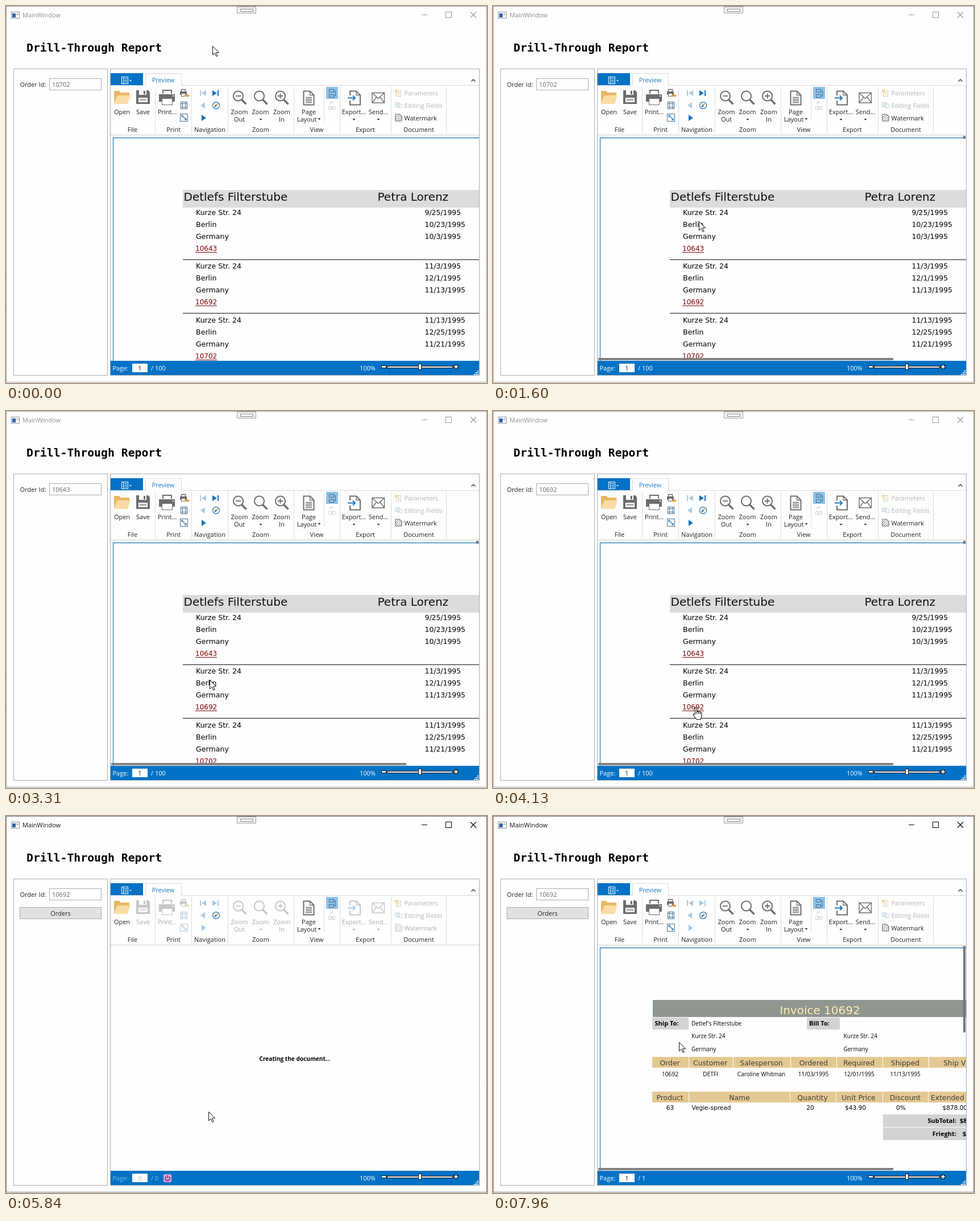
An HTML page that plays this animation: 846x662 px, repeating every 8 s.

```html
<!DOCTYPE html>
<html lang="en">
<head>
<meta charset="utf-8">
<title>Drill-Through Report</title>
<style>
html, body { margin: 0; width: 100%; height: 100%; overflow: hidden; background: #fefefe; }
svg { display: block; }
text { font: 11px "Open Sans", "Noto Sans", sans-serif; fill: #222; white-space: pre; }
.title { font: bold 19.8px "DejaVu Sans Mono", monospace; fill: #000; }
.head { font: 20px "DejaVu Sans", sans-serif; fill: #111; }
.body { font: 12.6px "DejaVu Sans", sans-serif; fill: #000; }
.date { font-size: 12.4px; }
.link { font-size: 12px; fill: #800000; }
.cream { fill: #fff0b5; }
.cell { font: 12.4px "DejaVu Sans", sans-serif; fill: #3c3c3c; }
.small { font-size: 10.1px; fill: #000; }
.item { font: 10.6px "DejaVu Sans", sans-serif; fill: #000; }
.bold { font-weight: bold; fill: #000; }
.off { fill: #b4b4b4; }
.grey { fill: #666; }
.white { fill: #fff; }
.blue { fill: #1a7cc4; }
.mid { text-anchor: middle; }
.end { text-anchor: end; }
</style>
</head>
<body>
<script>
const BLUE = '#0072c6', DARK = '#6d6d6d', LINE = '#a9abb0';
const GUIDE = 'stroke="#c9c9c9" stroke-dasharray="5 3"';

const rect = (x, y, w, h, fill) => `<rect x="${x}" y="${y}" width="${w}" height="${h}" fill="${fill}"/>`;
const box = (x, y, w, h, stroke, fill = 'none') =>
  `<rect x="${x + .5}" y="${y + .5}" width="${w - 1}" height="${h - 1}" stroke="${stroke}" fill="${fill}"/>`;
const path = (d, stroke, width = 1, fill = 'none', more = '') =>
  `<path d="${d}" stroke="${stroke}" stroke-width="${width}" fill="${fill}" ${more}/>`;
const shape = (d, fill) => `<path d="${d}" fill="${fill}"/>`;
const circle = (x, y, r, stroke, width, fill = 'none') =>
  `<circle cx="${x}" cy="${y}" r="${r}" stroke="${stroke}" stroke-width="${width}" fill="${fill}"/>`;
const text = (x, y, str, cls = '', more = '') => `<text x="${x}" y="${y}" class="${cls}" ${more}>${str}</text>`;
const mid = (x, y, str, cls = '') => text(x, y, str, 'mid ' + cls);
const group = (attrs, ...parts) => `<g ${attrs}>${parts.join('')}</g>`;
const caret = (x, y) => shape(`M${x - 2.5} ${y}h5l-2.5 3z`, '#333');

function windowFrame() {
  return group('',
    group('id="frame"', box(0, 0, 846, 661, 'currentColor')),
    rect(0, 471, 2, 1, '#ccc'), rect(0, 527, 2, 1, '#ccc'), rect(844, 471, 2, 1, '#ccc'),
    box(9, 10, 15, 12, '#8b8f96', '#fff'), rect(11, 13, 6, 7, '#2b62a8'), rect(18, 13, 4, 3, '#b9c7d8'),
    text(29, 20, 'MainWindow', '', 'id="caption"'),
    group('id="buttons"', rect(731, 15, 10, 1, 'currentColor'), box(773, 10, 11, 11, 'currentColor'),
      path('M817 10.5l10 10m0-10l-10 10', 'currentColor', 1.1)),
    box(406, 1, 34, 12, '#a0a0a0', '#f1f1f1'), box(412, 5, 23, 5, '#8a8a8a', '#fff'),
    text(36, 80, 'Drill-Through Report', 'title'),
    box(13, 110, 166, 539, LINE), box(183, 110, 650, 539, LINE),
    text(24.5, 142, 'Order Id:'),
    box(76, 127, 92, 21, LINE, '#fff'), text(81, 142, '', 'grey', 'id="field"'),
    group('id="orders"', box(24, 160, 144, 21, '#adadad', '#e1e1e1'), mid(96, 175, 'Orders')));
}

const magnifier = (x, sign) => circle(x, 158, 8.6, DARK, 2) + path(`M${x + 6} 164.5l8 8`, DARK, 3.2) +
  path(sign, DARK, 1.8);
const sheet = (x, stroke) => path(`M${x} 149.5h11l7 7v17h-18z`, stroke, 2, '#fff') +
  path(`M${x + 11} 149.5v7h7`, stroke, 1.3);

function ribbon() {
  const separators = [262, 326, 390, 506, 587, 677, 774].map(x => rect(x, 142, 1, 82, '#dcdcdc')).join('');
  const names = [[222.5, 'File'], [294.5, 'Print'], [358.5, 'Navigation'], [448, 'Zoom'], [546.5, 'View'],
    [632, 'Export'], [726, 'Document']].map(([x, s]) => mid(x, 221, s)).join('');
  return group('',
    rect(184, 118, 57, 22, BLUE),
    box(203, 124, 12, 13, '#fff'), rect(206, 124, 1, 13, '#fff'),
    path('M208 127.5h5m-5 3h5m-5 3h5', '#fff'), shape('M217 130h4l-2 2.5z', '#fff'),
    path('M184 139.5h61.5v-21h63v21H832', '#dadada'), mid(276.5, 134, 'Preview', 'blue'),
    path('M818.5 132.5l3.5-3.5 3.5 3.5', '#444', 1.5),
    rect(184, 226, 648, 1, '#cfcfcf'), separators, rect(559, 145, 1, 58, '#dcdcdc'), names,
    // open, compass and page layout never go grey
    shape('M190 171V149h9l3 3h15v6h-21z', '#e8b766'), shape('M196 157h23l-5 15h-24z', '#fbdca4'),
    mid(204, 190, 'Open'),
    circle(369.5, 174.5, 5.9, '#2477b5', 1.3, '#fff'), shape('M373 171l-2.2 5-2.8-2.8z', '#e0922f'),
    shape('M366 178l2-4.8 2.8 2.8z', '#2477b5'),
    sheet(523.5, DARK), path('M527 160.5h11m-11 3h11m-11 3h11m-11 3h11', DARK, 1.4),
    mid(532.5, 190, 'Page'), mid(529, 203, 'Layout'), caret(551, 197),
    rect(563, 142, 21, 21, '#8fc1e8'), path('M568.5 146.5h8v5h-8zM568.5 155.5h8v5h-8zM576.5 149h3v9h-3', '#466f91'),
    path('M567.5 176.5h5v5h-5zm6 0h5v5h-5zM570 173v-4h5m-2-1.5l2 1.5-2 2', '#cfcfcf'),
    // needs a finished document
    group('class="doc"',
      shape('M229 148h21l3 3v21h-24z', DARK), rect(234, 148, 13, 8, '#fff'), rect(242, 149, 3, 6, DARK),
      rect(233, 161, 16, 8, '#fff'), rect(235, 164, 12, 1.5, DARK), mid(241, 190, 'Save'),
      rect(275, 147, 17, 7, DARK), rect(277, 149, 13, 5, '#fff'), shape('M269 155h28v13h-28z', DARK),
      box(274, 162, 19, 12, DARK, '#fff'), rect(293, 157, 2, 2, '#fff'), mid(283.5, 190, 'Print...'),
      path('M308.5 150v-3.5h7v3.5', DARK, 1.4), rect(306, 150, 12, 6, DARK), box(308, 153, 8, 6, DARK, '#fff'),
      shape('M314 156h6l-2-2.5 5 4-5 4 2-2.500h-6z', '#dda04a'),
      box(307, 168, 12, 13, '#4d7291'), path('M310.5 168v13m5-13v13M307 171.500h12m-12 6h12', '#4d7291'),
      box(306, 189, 14, 14, '#4d7291'), path('M309 195v-3h3m-3 0l8 8m0-3v3h-3', '#2477b5', 1.2),
      magnifier(408.5, 'M404 158h9'), magnifier(445.5, ''), magnifier(482.5, 'M478 158h9m-4.500-4.500v9'),
      mid(410.5, 190, 'Zoom'), mid(410.5, 203, 'Out'), mid(447.5, 190, 'Zoom'), caret(448, 198),
      mid(485, 190, 'Zoom'), mid(485, 203, 'In'),
      sheet(605, DARK), rect(603, 157, 4, 9, '#fff'), path('M601 161.500h13m-4-4l4 4-4 4', '#2477b5', 2),
      mid(612, 190, 'Export...'), caret(612, 198),
      path('M644 152.500h21.500v17.500h-21.500zl10.700 10 10.800-10m-21.500 17.500l7.500-10m14 10l-7.500-10', DARK, 1.4),
      mid(655, 190, 'Send...'), caret(655, 198),
      path('M685 190h7l4 4v8h-11z', DARK, 1.2, '#fff'), path('M685 196l6-6m-6 10l9-9m-7 11l9-8m-5 8l5-4', DARK),
      text(700.5, 201, 'Watermark')),
    shape('M341 148h2v10h-2zM352 148v10l-8-5z', '#accae2'), shape('M350 169v11l-8-5.500z', '#accae2'),
    group('class="nav"', shape('M363 148v10l8-5zM372 148h2v10h-2z', '#1873b8'), shape('M344 191v11l8-5.500z', '#1873b8')),
    box(686, 148, 9, 11, '#d8d0bc', '#fffaf0'), rect(684, 147, 5, 5, '#f1dca5'), rect(690, 151, 1, 5, '#d8c08a'),
    text(700.5, 157, 'Parameters', 'off'),
    path('M684 170.500h9m-9 3h7m-7 3h9', '#bcd3e6', 1.5), box(690, 172, 7, 7, '#d3d3d3'),
    text(700.5, 179, 'Editing Fields', 'off'));
}

const page = guideX => path('M832 231.500H188.500V623', '#3585bd', 1.3) +
  path(`M${guideX}.5 232V623M189 323.500H832`, '', 1, 'none', GUIDE);

function report() {
  const dates = [['9/25/1995', '10/23/1995', '10/3/1995', '10643'], ['11/3/1995', '12/1/1995', '11/13/1995', '10692'],
    ['11/13/1995', '12/25/1995', '11/21/1995', '10702']];
  const blocks = dates.map((row, i) => {
    const y = 367 + Math.round(i * 94.3), id = row[3];
    return ['Kurze Str. 24', 'Berlin', 'Germany'].map((s, j) =>
      text(334, y + 21 * j, s, 'body') + text(736.5, y + 21 * j, row[j], 'body date')).join('') +
      text(333, y + 63, id, 'body link') + rect(333, y + 65, 38, 1, '#800000') +
      rect(311, y + 78, 521, 1, '#111');
  }).join('');
  return group('id="report"', page(276), rect(311, 323, 521, 31, '#dcdcdc'),
    text(312.5, 342, 'Detlefs Filterstube', 'head'), text(653.5, 342, 'Petra Lorenz', 'head'), blocks);
}

function invoice() {
  const header = (y, stops, labels) => stops.slice(1).map((x, i) =>
    rect(stops[i], y, x - stops[i] - 1, 19, '#e4c891')).join('') + labels.map(([x, s]) => mid(x, y + 15, s, 'cell')).join('');
  const values = (y, cls, list) => list.map(([x, s]) => mid(x, y, s, cls)).join('');
  return group('id="invoice"', page(279),
    rect(281, 323, 551, 30, '#8f9690'), mid(575, 348, 'Invoice 10692', 'head cream'),
    rect(280, 354, 64, 21, '#d3d3d3'), rect(552, 354, 58, 21, '#d3d3d3'),
    text(284.5, 368, 'Ship To:', 'bold'), text(556, 368, 'Bill To:', 'bold'),
    text(349, 368, "Detlef's Filterstube", 'small'),
    [349, 616.5].map(x => text(x, 390, 'Kurze Str. 24', 'small') + text(x, 413, 'Germany', 'small')).join(''),
    header(423, [280, 345, 423, 524, 605, 686, 767, 850], [[311, 'Order'], [382, 'Customer'], [472, 'Salesperson'],
      [564, 'Ordered'], [643.5, 'Required'], [725, 'Shipped']]), text(792, 438, 'Ship Via', 'cell'),
    values(457, 'small', [[311.5, '10692'], [382.5, 'DETFI'], [472, 'Caroline Whitman'], [563.5, '11/03/1995'],
      [644, '12/01/1995'], [725, '11/13/1995']]),
    header(484, [280, 345, 523, 604, 686, 766, 850], [[311, 'Product'], [433.5, 'Name'], [562, 'Quantity'],
      [643, 'Unit Price'], [725, 'Discount']]), text(770, 499, 'Extended Price', 'cell'),
    values(516, 'item', [[311.5, '63'], [384, 'Vegie-spread'], [558, '20'], [637.5, '$43.90'], [717.5, '0%']]),
    text(790.5, 516, '$878.00', 'item'),
    rect(686, 524, 146, 22, '#d3d3d3'), rect(686, 547, 146, 22, '#d3d3d3'),
    text(815, 539, 'SubTotal:', 'bold end'), text(821, 539, '$878.00', 'bold'),
    text(815, 562, 'Frieght:', 'bold end'), text(826, 562, '$61.02', 'bold'));
}

function statusBar() {
  const grip = [[829, 640], [826, 643], [829, 643], [823, 646], [826, 646], [829, 646]]
    .map(([x, y]) => rect(x, y, 2, 2, '#fff')).join('');
  return group('', rect(184, 623, 648, 25, BLUE),
    group('id="pager"', text(187.5, 640, 'Page:', 'white'), text(255, 640, '', 'white', 'id="total"')),
    rect(222, 628, 27, 15, '#fff'), mid(235.5, 640, '', '', ).replace('<text', '<text id="current"'),
    group('id="stop"', `<rect x="277" y="629" width="14" height="14" rx="2" fill="#d9a5d6"/>`,
      path('M281.500 633a4 4 0 1 0 5 0M284 631v5', '#6a2f86', 1.6)),
    text(622, 640, '100%', 'white'),
    box(670, 632, 116, 4, '#111', '#fff'), box(660, 631, 9, 5, '#111', '#fff'),
    box(725, 628, 6, 11, '#111', '#fff'),
    path('M791.500 629v9m-4.500-4.500h9', '#111', 4.500), path('M791.500 630v7m-3.500-3.500h7', '#fff', 2),
    rect(674, 641, 1, 2, '#123'), rect(782, 641, 1, 2, '#123'), grip);
}

document.body.innerHTML = `<svg width="846" height="662" viewBox="0 0 846 662">
  <clipPath id="view"><rect x="184" y="227" width="648" height="396"/></clipPath>` +
  windowFrame() + ribbon() +
  group('clip-path="url(#view)"', report(), invoice(), mid(508, 430, 'Creating the document...', 'small bold').replace('<text', '<text id="busy"'),
    group('id="bars"', rect(185, 618, 519, 4, '#808080'),
      `<rect id="thumb" x="827" y="228" width="4" fill="#777"/>`)) +
  statusBar() +
  group('id="cursor"',
    path('M.5 .5V16l3.800-3.500 2.600 6 2.300-1-2.600-5.800h5z', '#111', 1, '#fff', 'id="arrow"'),
    path('M-.5 13V2.500a1.500 1.500 0 0 1 3 0V9q2.500-1.500 3 .5 2.600-1.200 3 .8 2.400-.8 2.500 1.200V16q0 3-2 6.500H2L-3.500 15.500q-1-2.500 1.200-2.800l1.800 2M2.500 9v4m3-3.500v3.500m3-2.500v3',
      '#111', 1.1, '#fff', 'id="hand" stroke-linejoin="round"')) + '</svg>';

const $ = id => document.getElementById(id);
const show = (id, on) => { $(id).style.display = on ? '' : 'none'; };
const fade = (cls, on) => document.querySelectorAll('.' + cls).forEach(e => { e.style.opacity = on ? 1 : .38; });

// pointer moves: start, end, steps, x, y reached
const MOVES = [[500, 1300, 9, 363, 355], [1400, 2200, 9, 361, 423], [2300, 2400, 2, 360, 428],
  [2910, 3710, 9, 357, 507], [3810, 4130, 4, 356, 519], [7240, 7960, 8, 327, 397]];

function pointer(t) {
  let x = 363, y = 70;
  for (const [start, end, steps, toX, toY] of MOVES) {
    if (t < start) break;
    const done = Math.min(steps, Math.floor((t - start) / (end - start) * (steps - 1) + 1e-6) + 1) / steps;
    x += (toX - x) * done;
    y += (toY - y) * done;
  }
  return [Math.round(x), Math.round(y)];
}

function draw(t) {
  const active = t >= 5120, cleared = t >= 5520, greyed = t >= 5740 && t < 5940, ready = t >= 5940;
  const busy = cleared && !ready, [x, y] = pointer(t);
  const hand = !cleared && (y >= 416 && y < 433 || y >= 511 && y < 528);

  $('frame').style.color = active ? '#777' : '#a0a0a0';
  $('buttons').style.color = active ? '#000' : '#999';
  $('caption').style.fill = active ? '#111' : '#8c8c8c';
  $('field').textContent = t >= 3700 && y >= 511 || active ? '10692' : y >= 416 ? '10643' : '10702';
  show('orders', t >= 5740);
  fade('doc', !greyed);
  fade('nav', t < 5740);

  show('report', !cleared);
  show('busy', busy);
  show('invoice', ready);
  show('bars', y > 226 && !busy);
  $('thumb').setAttribute('height', ready ? 152 : 5);

  $('pager').style.opacity = busy ? .5 : 1;
  $('current').textContent = busy ? 0 : 1;
  $('current').style.fill = busy ? '#bbb' : '#222';
  $('total').textContent = '/ ' + (busy ? 0 : ready ? 1 : 100);
  show('stop', busy);

  $('cursor').setAttribute('transform', `translate(${x} ${y})`);
  show('arrow', !hand);
  show('hand', hand);
}

const begin = performance.now();
function tick() {
  draw((performance.now() - begin) % 8000);
  requestAnimationFrame(tick);
}
tick();
</script>
</body>
</html>
```
